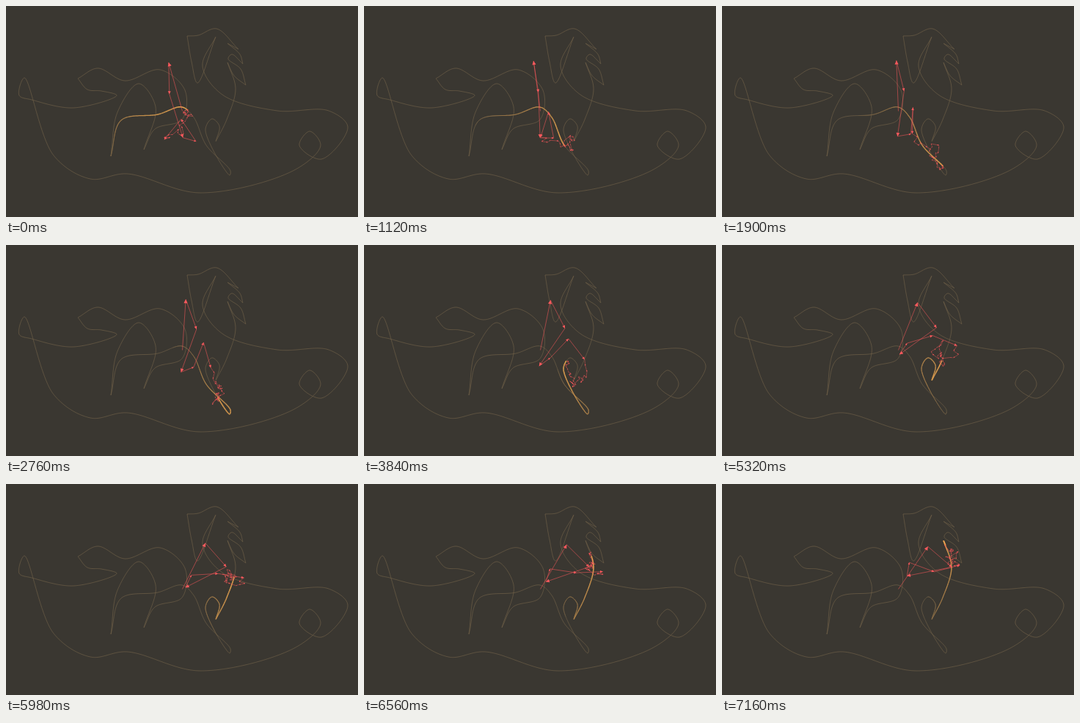
An HTML page with a canvas for the animation above (7.18 s loop, 480 px wide and 288 px high).

```html
<!DOCTYPE html>
<html lang="en">
<head>
<meta charset="utf-8">
<style>
  html, body { margin: 0; width: 100%; height: 100%; overflow: hidden; background: #3a3731; }
  canvas { display: block; }
</style>
</head>
<body>
<canvas id="stage" width="480" height="288"></canvas>
<script>
const LOOP = 7180, TICK = 20, TRAIL = 160, PAIRS = 50;
const N = 2680;      // ticks in one full turn of the slowest arm
const LEAD = 147;    // ticks already drawn when the loop starts
const TRACED = LEAD + LOOP / TICK;
const TAU = 2 * Math.PI, ORIGIN = [240.5, 143.5];
const ctx = document.getElementById('stage').getContext('2d');

// Key points of the closed outline; each line is a smooth stroke ending in a sharp corner.
const strokes = `
  157,156 207,148 240,138 256,152 273,190 306,225 305,231 272,169 281,154 291,164 286,185
  301,155 313,113 302,77
  311,95 327,108
  320,86 303,72 308,66 323,79
  319,66 302,51
  317,59
  287,31 262,40 247,41
  253,76 261,105 286,42
  268,82 295,121 370,143 440,143 466,165 430,209 400,190 414,171 429,190 395,223 265,255 165,229 115,236 65,204 25,98 18,122 35,128 92,139 151,122 130,116 111,114 98,99
  125,85 162,102 210,87 244,115 240,155 203,168 188,196
  204,138 181,106 152,145 143,205`
  .trim().split('\n').map(line => line.trim().split(' ').map(p => p.split(',').map(Number)));

const dist = (a, b) => Math.hypot(a[0] - b[0], a[1] - b[1]);
const mix = (a, b, u) => a.map((v, k) => v + (b[k] - v) * u);
const wrap = i => path[(i % N + N) % N];

// Open centripetal Catmull-Rom spline.
function spline(pts, steps) {
  const out = [], last = pts.length - 1;
  for (let i = 0; i < last; i++) {
    const p1 = pts[i], p2 = pts[i + 1];
    const p0 = pts[i - 1] || mix(p2, p1, 2), p3 = pts[i + 2] || mix(p1, p2, 2);
    const a = Math.sqrt(dist(p0, p1)), b = Math.sqrt(dist(p1, p2)), c = Math.sqrt(dist(p2, p3));
    for (let s = 0; s < steps; s++) {
      const u = s / steps, u2 = u * u, u3 = u2 * u;
      out.push([0, 1].map(k => {
        const d = p2[k] - p1[k];
        const m1 = d + b * ((p1[k] - p0[k]) / a - (p2[k] - p0[k]) / (a + b));
        const m2 = d + b * ((p3[k] - p2[k]) / c - (p3[k] - p1[k]) / (b + c));
        return p1[k] + m1 * u + (3 * d - 2 * m1 - m2) * u2 + (m1 + m2 - 2 * d) * u3;
      }));
    }
  }
  return out;
}

// N points along the closed line: one pixel per tick where the pen is seen, even steps after.
function resample(pts) {
  const next = i => pts[(i + 1) % pts.length];
  const total = pts.reduce((sum, p, i) => sum + dist(p, next(i)), 0);
  const rest = (total - TRACED) / (N - TRACED);
  const out = [];
  let seg = 0, start = 0;
  for (let n = 0; n < N; n++) {
    const s = n < TRACED ? n : TRACED + (n - TRACED) * rest;
    let len;
    while (start + (len = dist(pts[seg], next(seg))) < s && seg < pts.length - 1) {
      start += len;
      seg++;
    }
    out.push(mix(pts[seg], next(seg), (s - start) / len));
  }
  return out;
}

const path = resample(strokes.flatMap((pts, i) => {
  const before = strokes[(i || strokes.length) - 1];
  return spline([before[before.length - 1], ...pts], 30);
}));

function coefficient(freq) {
  let x = 0, y = 0;
  path.forEach(([px, py], i) => {
    const a = -TAU * freq * i / N, c = Math.cos(a), s = Math.sin(a);
    x += px * c - py * s;
    y += px * s + py * c;
  });
  return { freq, x: x / N, y: y / N, size: Math.hypot(x, y) / N, phase: Math.atan2(y, x) };
}

const centre = coefficient(0);
const arms = [];
for (let f = 1; f <= PAIRS; f++) arms.push(coefficient(f), coefficient(-f));

const outline = new Path2D();
path.forEach(p => outline.lineTo(...p));
outline.closePath();

function drawTrail(n) {
  const dim = [104, 89, 66], hot = [246, 172, 82];
  for (let i = TRAIL; i > 0; i--) {
    const k = (1 - i / TRAIL) ** 0.85;
    ctx.strokeStyle = `rgb(${mix(dim, hot, k)})`;
    ctx.lineWidth = 0.7 + 0.9 * k;
    ctx.beginPath();
    ctx.moveTo(...wrap(n - i));
    ctx.lineTo(...wrap(n - i + 1));
    ctx.stroke();
  }
}

function drawArms(n) {
  let { x, y } = centre, from = ORIGIN;
  ctx.strokeStyle = 'rgba(255,88,92,.7)';
  ctx.fillStyle = '#ff5a5e';
  for (const { freq, size, phase } of arms) {
    const a = phase + TAU * freq * n / N, c = Math.cos(a), s = Math.sin(a);
    x += size * c;
    y += size * s;
    const head = 0.6 * Math.sqrt(size), half = head * 0.5;
    ctx.lineWidth = Math.min(0.75, 0.35 + size / 40);
    ctx.beginPath();
    ctx.moveTo(...from);
    ctx.lineTo(x, y);
    ctx.stroke();
    ctx.beginPath();
    ctx.moveTo(x, y);
    ctx.lineTo(x - head * c - half * s, y - head * s + half * c);
    ctx.lineTo(x - head * c + half * s, y - head * s - half * c);
    ctx.fill();
    from = [x, y];
  }
}

function draw() {
  const n = LEAD + Math.floor(performance.now() % LOOP / TICK);
  ctx.fillStyle = '#3a3731';
  ctx.fillRect(0, 0, 480, 288);
  ctx.strokeStyle = '#71624a';
  ctx.lineWidth = 0.7;
  ctx.stroke(outline);
  drawTrail(n);
  drawArms(n);
  requestAnimationFrame(draw);
}
draw();
</script>
</body>
</html>
```
